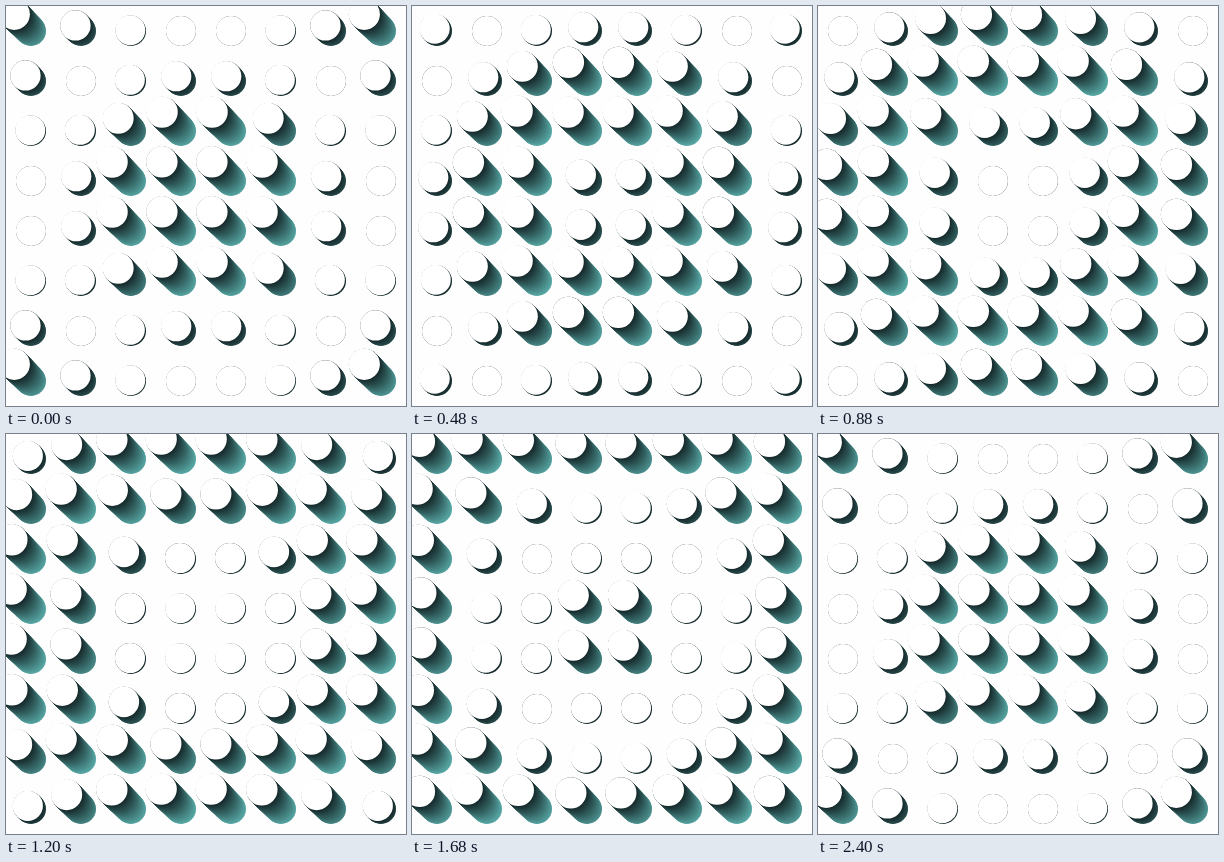
An HTML page with a canvas for the animation above (2.48 s loop, 400x400 px).

```html
<!DOCTYPE html>
<html>
<head>
<meta charset="utf-8">
<style>
  html, body { margin: 0; overflow: hidden; background: #fefefe; }
  canvas { display: block; }
</style>
</head>
<body>
<canvas id="stage" width="400" height="400"></canvas>
<script>
const ctx = document.getElementById('stage').getContext('2d');
const STEP = 80, LOOP = 2480, PERIOD = 2400;
const CELLS = 8, PITCH = 50, RADIUS = 15, GROWTH = 0.04, MAX_LIFT = 20;
const DELAY = 0.22, PHASE = 0.252, POWER = 2.5;
const DARK = [22, 40, 42], TEAL = [89, 170, 167];

function disc(x, y, z, color) {
  ctx.fillStyle = color;
  ctx.beginPath();
  ctx.arc(x - z, y - z, RADIUS + GROWTH * z, 0, 2 * Math.PI);
  ctx.fill();
}

function shade(depth) {
  return `rgb(${DARK.map((c, i) => c + (TEAL[i] - c) * depth)})`;
}

function easeInOut(p) {
  return p < 0.5 ? (2 * p) ** POWER / 2 : 1 - (2 - 2 * p) ** POWER / 2;
}

// Rises from 0 to 1 and back once per unit of t.
function pulse(t) {
  const phase = t - Math.floor(t);
  return easeInOut(1 - Math.abs(2 * phase - 1));
}

// A column rising towards the upper left, darkest under its white cap.
function column(x, y, lift) {
  for (let z = 0; z < lift; z += 0.5) disc(x, y, z, shade((lift - z) / MAX_LIFT));
  disc(x, y, lift, '#fff');
}

function draw(now) {
  const time = Math.floor((now % LOOP) / STEP) * STEP / PERIOD;
  ctx.fillStyle = '#fefefe';
  ctx.fillRect(0, 0, 400, 400);
  for (let row = 0; row < CELLS; row++) {
    for (let col = 0; col < CELLS; col++) {
      const dist = Math.hypot(col - 3.5, row - 3.5);
      const lift = MAX_LIFT * pulse(time - PHASE - DELAY * dist);
      column((col + 0.5) * PITCH, (row + 0.5) * PITCH, lift);
    }
  }
  requestAnimationFrame(draw);
}
requestAnimationFrame(draw);
</script>
</body>
</html>
```
